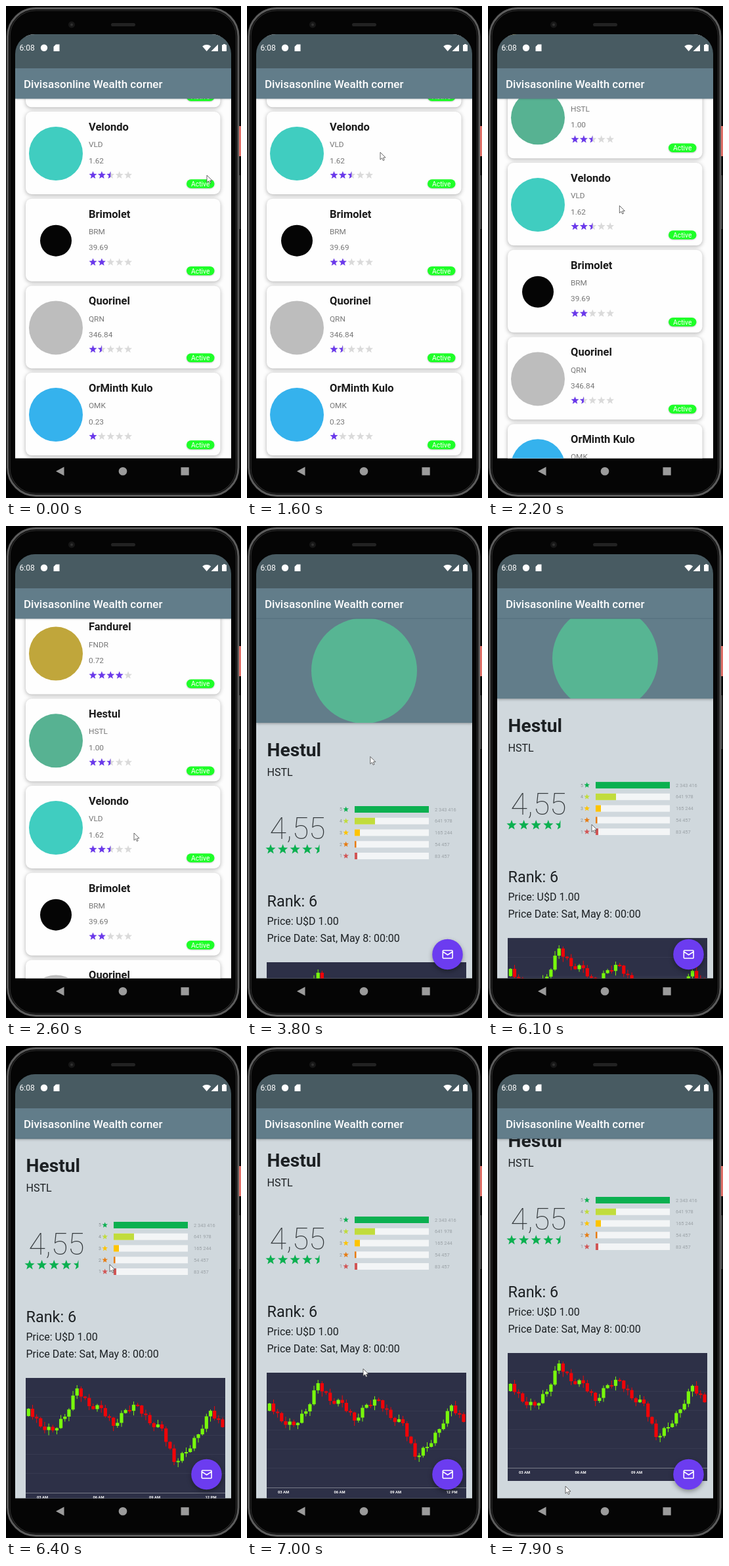
Animation, 358 px wide and 750 px high, one loop 8 s. Source, as an HTML page with a canvas:

```html
<!DOCTYPE html>
<html lang="es">
<head>
<meta charset="utf-8">
<title>Invest app</title>
<style>
html, body { margin: 0; width: 100%; height: 100%; overflow: hidden; background: #000; }
canvas { display: block; width: 358px; height: 750px; }
</style>
</head>
<body>
<canvas></canvas>
<script>
const canvas = document.querySelector('canvas');
const c = canvas.getContext('2d');
const ratio = window.devicePixelRatio || 1;
canvas.width = 358 * ratio;
canvas.height = 750 * ratio;

const LOOP = 8000, OPEN_AT = 3800;
const BAR = '#627d8a', INK = '#1c2023', GREEN = '#0bb050', GREY = '#9b9b9b';

const coins = [
  ['Fandurel', 'FNDR', '0.72', 4, '#c0a63b', 41],
  ['Hestul', 'HSTL', '1.00', 2.5, '#57b292', 41],
  ['Velondo', 'VLD', '1.62', 2.5, '#40cdc0', 41],
  ['Brimolet', 'BRM', '39.69', 2, '#050505', 24],
  ['Quorinel', 'QRN', '346.84', 1.5, '#bdbdbd', 41],
  ['OrMinth Kulo', 'OMK', '0.23', 1, '#35b2ed', 41]
];
const votes = [
  ['2 343 416', 113, GREEN], ['641 978', 31, '#c1dc3c'], ['165 244', 8, '#fdc400'],
  ['54 457', 2.5, '#e67c12'], ['83 457', 4, '#d15555']
];
// Every third closing price, as a distance below the chart's top
const trend = [47, 74, 80, 59, 16, 43, 46, 73, 49, 42, 69, 77, 128, 113, 86, 50, 75];
// Free cursor moves: start, end, dx, dy
const moves = [
  [300, 1400, -103, -35], [1950, 2600, -8, 10], [2900, 3500, -5, -128], [3750, 4000, -20, 107],
  [4850, 5700, -12, 45], [6550, 7000, 19, 167], [7400, 7900, -59, 209]
];

function ramp(t, from, to) {
  const p = Math.min(1, Math.max(0, (t - from) / (to - from)));
  return p * p * (3 - 2 * p);
}

function pose(t) {
  const list = 235 * ramp(t, 1950, 2600);
  const flick = ramp(t, 4000, 4230);
  const head = 159 * (flick - ramp(t, 4350, 4580) + ramp(t, 5965, 6400));
  const body = 34 * (flick - ramp(t, 4350, 4850)) + 8 * ramp(t, 6400, 6550) + 30 * ramp(t, 7050, 7350);
  const scrim = ramp(t, 4130, 4330) - ramp(t, 4420, 4720) + ramp(t, 6340, 6800);
  // Drags carry the cursor along with the page
  let x = 306, y = 258 + list - head - body;
  for (const [from, to, dx, dy] of moves) {
    x += dx * ramp(t, from, to);
    y += dy * ramp(t, from, to);
  }
  return { list, head, body, scrim, x, y };
}

function rect(x, y, w, h, color) {
  c.fillStyle = color;
  c.fillRect(x, y, w, h);
}

function round(x, y, w, h, r, color) {
  c.beginPath();
  c.roundRect(x, y, w, h, r);
  if (color) { c.fillStyle = color; c.fill(); }
}

function stroke(width, color) {
  c.lineWidth = width;
  c.strokeStyle = color;
  c.stroke();
}

function disc(x, y, r, color) {
  c.beginPath();
  c.arc(x, y, r, 0, 7);
  c.fillStyle = color;
  c.fill();
}

function poly(points, color) {
  c.beginPath();
  for (let i = 0; i < points.length; i += 2) c.lineTo(points[i], points[i + 1]);
  c.closePath();
  c.fillStyle = color;
  c.fill();
}

// y is the middle of the capitals
function text(s, x, y, size, color, weight = 400, align = 'left') {
  c.font = `${weight} ${size}px Roboto, sans-serif`;
  c.textAlign = align;
  c.fillStyle = color;
  c.fillText(s, x, y + size * .355);
}

function shaded(blur, dy, alpha, draw) {
  c.save();
  c.shadowColor = `rgba(0,0,0,${alpha})`;
  c.shadowBlur = blur * ratio;
  c.shadowOffsetY = dy * ratio;
  draw();
  c.restore();
}

function clipped(shape, draw) {
  c.save();
  shape();
  c.clip();
  draw();
  c.restore();
}

function star(x, y, r, color) {
  const points = [];
  for (let i = 0; i < 10; i++) {
    const a = i * Math.PI / 5, d = i % 2 ? r * .42 : r;
    points.push(x + d * Math.sin(a), y - d * Math.cos(a));
  }
  poly(points, color);
}

function stars(x, y, gap, r, score, color, empty) {
  for (let i = 0; i < 5; i++) {
    const sx = x + i * gap, part = Math.min(1, Math.max(0, score - i));
    if (empty) star(sx, y, r, empty);
    if (part) clipped(() => round(sx - r, y - r, 2 * r * part, 2 * r, 0), () => star(sx, y, r, color));
  }
}

function card([name, code, price, score, color, r], y) {
  shaded(6, 1.5, .3, () => round(30, y, 296.5, 126, 9, '#fefefe'));
  disc(76, y + 64, r, color);
  text(name, 126, y + 23, 16.5, '#1b1b1b', 700);
  text(code, 126, y + 50, 11.8, '#777');
  text(price, 126, y + 74.5, 11.8, '#777');
  stars(132.5, y + 97, 13.4, 6.3, score, '#6a38ec', '#dadada');
  shaded(2, .8, .25, () => round(275, y + 103.2, 42.5, 13.5, 6.7, '#1eff28'));
  text('Active', 296.3, y + 110.2, 10.3, '#fff', 400, 'center');
}

function list(shift) {
  rect(14, 95, 329, 595, '#fdfdfd');
  coins.forEach((coin, i) => card(coin, 161 + (i - 2) * 132.7 + shift));
}

function closing(i) {
  const k = Math.floor(i / 3), next = trend[k + 1] ?? trend[k];
  return trend[k] + (next - trend[k]) * (i % 3) / 3 + 4 * Math.sin(i * Math.PI * 2 / 3);
}

function chart(y) {
  rect(30, y, 304, 195, '#2d3047');
  for (let i = 1; i < 6; i++) rect(30, y + i * 29, 304, .6, '#3d4057');
  for (let i = 0, open = 58; i < 49; i++) {
    const close = closing(i), x = 34.3 + i * 6.16;
    const top = Math.min(open, close), h = Math.abs(close - open);
    const up = 1 + i * 5 % 7, down = 1 + i * 3 % 8;
    const color = close < open ? '#78f80c' : '#f00408';
    rect(x - .5, y + top - up, 1, h + up + down, color);
    rect(x - 2.6, y + top, 5.2, Math.max(2, h), color);
    open = close;
  }
  rect(30, y + 175, 304, .8, '#8a8c98');
  ['03 AM', '06 AM', '09 AM', '12 PM'].forEach((s, i) =>
    text(s, 55.5 + i * 85.5, y + 182, 5.8, '#fff', 700, 'center'));
}

function mailButton() {
  shaded(7, 3, .35, () => disc(305.5, 653, 23.3, '#6c3cf0'));
  round(298.3, 647, 14.8, 12, 1);
  c.moveTo(298.5, 649);
  c.lineTo(305.7, 653.7);
  c.lineTo(313, 649);
  stroke(1.6, '#fff');
}

function detail({ head, body, scrim }) {
  const edge = 300 - head, y = 341 - head - body;
  const [name, code] = coins[1];
  rect(14, 95, 329, 595, '#d0d8dd');
  text(name, 30.5, y, 28.2, INK, 700);
  text(code, 30.5, y + 34, 16, INK);
  text('4,55', 34.5, y + 119.5, 46.5, '#33383b', 200);
  stars(36, y + 152, 18.6, 8, 4.5, GREEN);
  votes.forEach(([count, w, color], i) => {
    const by = y + 91 + i * 17.75;
    text(5 - i, 141, by, 7, '#8b9296');
    star(150.7, by, 4.6, color);
    rect(164, by - 5, 113, 10, '#f3f5f6');
    rect(164, by - 5, w, 10, color);
    text(count, 286, by, 7.4, '#9aa1a6');
  });
  text('Rank: 6', 30.5, y + 231, 23.4, INK);
  text('Price: U$D 1.00', 30.5, y + 261, 16, INK);
  text('Price Date: Sat, May 8: 00:00', 30.5, y + 287.5, 16, INK);
  chart(y + 324);

  shaded(4, 1, .35, () => rect(14, 95, 329, edge - 95, BAR));
  clipped(() => round(14, 95, 329, edge - 95, 0), () => {
    disc(178.5, 220.5 - head / 2, 80.5, '#57b593');
    c.globalAlpha = scrim;
    rect(14, 95, 329, edge - 95, BAR);
  });
  mailButton();
}

function toolbar(open) {
  shaded(3, 1, open ? 0 : .25, () => rect(14, 95, 329, 46.4, BAR));
  if (open) rect(14, 140.5, 329, 1, 'rgba(50,75,88,.3)');
  text('Divisasonline Wealth corner', 27, 119, 17, '#fff', 500);
}

function statusBar() {
  rect(14, 43, 329, 52, '#485b62');
  text('6:08', 20.5, 64, 12, '#fff');
  disc(58, 63.7, 5.2, '#fff');
  poly([76, 58.5, 81.5, 58.5, 81.5, 69, 72.5, 69, 72.5, 62], '#fff');
  c.beginPath();
  c.moveTo(305.7, 69);
  c.arc(305.7, 69, 10, -2.28, -.86);
  c.fill();
  poly([323, 58.5, 323, 69, 312.5, 69], '#fff');
  rect(331, 58, 3, 2, '#fff');
  round(329, 59, 7, 10, 1, '#fff');
}

function phone() {
  rect(0, 0, 358, 750, '#000');
  round(2.5, 3.5, 351.5, 743, 43, '#0c0c0c');
  stroke(3, '#5c5c5c');
  round(6, 7, 344.5, 736, 39, '#050505');
  stroke(1.2, '#2c2c2c');
  rect(355, 183, 3, 46, '#e07068');
  rect(355, 258, 2, 82, '#444');
  disc(100, 28.5, 5, '#171717');
  disc(100, 28.5, 2, '#303030');
  round(160, 26, 37, 5, 2.5, '#222');
}

function navBar() {
  poly([88.5, 702.5, 88.5, 716, 76, 709.2], GREY);
  disc(178, 709.2, 6.3, GREY);
  rect(266.5, 703.2, 12.2, 12.2, GREY);
}

function cursor({ x, y }) {
  c.save();
  c.translate(x, y);
  poly([0, 0, 0, 11.2, 2.6, 8.8, 4.4, 12.6, 6.2, 11.8, 4.5, 8.2, 8, 8], '#fff');
  stroke(.8, '#444');
  c.restore();
}

function frame(now) {
  const t = now % LOOP, open = t >= OPEN_AT, state = pose(t);
  c.setTransform(ratio, 0, 0, ratio, 0, 0);
  phone();
  clipped(() => round(14, 43, 329, 646.6, [30, 30, 0, 0]), () => {
    if (open) detail(state);
    else list(state.list);
    toolbar(open);
    statusBar();
  });
  navBar();
  cursor(state);
  requestAnimationFrame(frame);
}
frame(performance.now());
</script>
</body>
</html>
```
